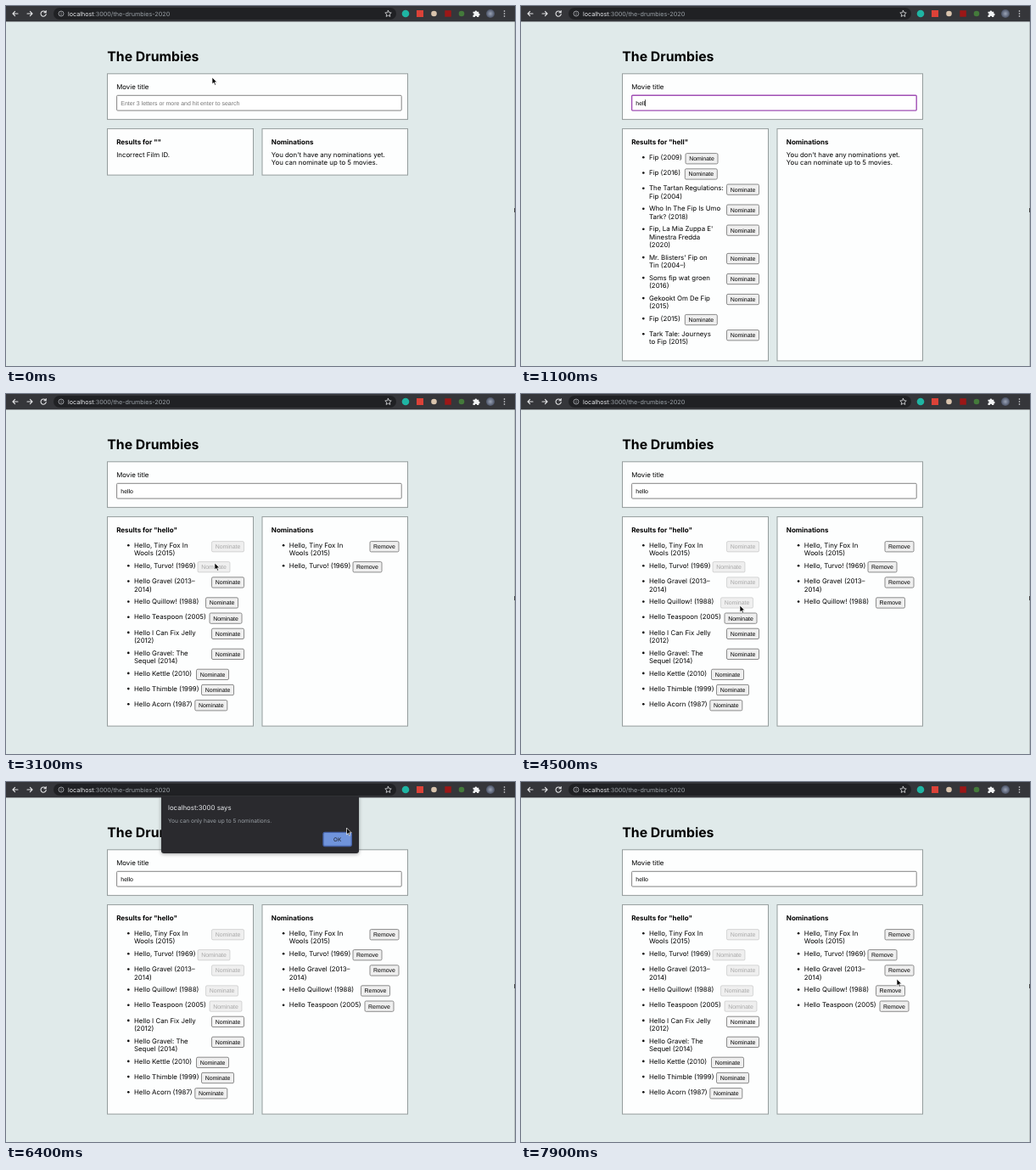
These frames come from a looping animation (600 px wide and 424 px high, 8000 ms). An HTML page:

```html
<!DOCTYPE html>
<html lang="en">
<head>
<meta charset="utf-8">
<title>Movie nominations</title>
<style>
  html, body { margin: 0; width: 100%; height: 100%; overflow: hidden; background: #e0eaea; }
  svg { display: block; width: 600px; height: 424px; }
  text { font: 7.85px Inter, Roboto, sans-serif; fill: #000; text-rendering: geometricPrecision; white-space: pre; }
  .h1 { font-size: 15.8px; font-weight: 700; }
  .h2 { font-size: 8px; font-weight: 700; }
  .ui { font-family: "Liberation Sans", Arial, sans-serif; font-size: 6.95px; }
  .hint { fill: #757575; }
  .mid { text-anchor: middle; }
  .url { font-size: 7.2px; fill: #9aa0a6; }
  .panel { fill: #fdfefe; stroke: #949c9c; stroke-width: 1; }
  .icon { fill: none; stroke: #e3e4e6; stroke-width: 1.1; stroke-linecap: round; stroke-linejoin: round; }
</style>
</head>
<body>
<svg viewBox="0 0 600 424" xmlns="http://www.w3.org/2000/svg">
  <defs>
    <radialGradient id="face"><stop offset="0" stop-color="#9aa3b5"/><stop offset="1" stop-color="#4c5468"/></radialGradient>
    <filter id="shade" x="-10%" y="-10%" width="120%" height="130%"><feDropShadow dx="0" dy="1" stdDeviation="2" flood-opacity=".35"/></filter>
  </defs>
  <rect width="600" height="424" fill="#e0eaea"/>
  <path d="M599.5 18V424" stroke="#bcc4c4"/>
  <path d="M599.5 238v5" stroke="#444"/>
  <g id="page"></g>

  <g id="toolbar">
    <rect width="600" height="18.4" fill="#35363a"/>
    <rect x="56" y="2" width="404" height="14" rx="7" fill="#202124"/>
    <path class="icon" d="M14 9H8M10.6 6.3 8 9l2.6 2.7M25 9h6M28.4 6.3 31 9l-2.6 2.7"/>
    <path class="icon" d="M46.6 7.2A3.1 3.1 0 1 0 47.2 9.6M47.2 5.6v2.2H45"/>
    <g stroke="#b4b7bb" fill="none" stroke-width=".8"><circle cx="65" cy="9" r="3"/><path d="M65 8.6v2M65 7v.7"/></g>
    <text class="url" x="73" y="11.6"><tspan fill="#e8eaed">localhost</tspan>:3000/the-drumbies-2020</text>
    <path class="icon" style="stroke-width:.8" d="M450.5 5.3l1.1 2.4 2.6.3-1.9 1.8.5 2.6-2.3-1.3-2.3 1.3.5-2.6-1.9-1.8 2.6-.3z"/>
    <circle cx="471" cy="9" r="4.3" fill="#1fb5a3"/>
    <rect x="484" y="5" width="8" height="8" fill="#db4238"/>
    <circle cx="504.5" cy="9" r="3.3" fill="#d9c4ad"/>
    <rect x="517.3" y="5.2" width="7.5" height="7.5" fill="#9c1717"/>
    <circle cx="537" cy="9" r="3.3" fill="#447a3b"/>
    <path fill="#f1f3f4" d="M550.5 6.7h2.1a1.3 1.3 0 0 1 2.6 0h2.1v2.1a1.3 1.3 0 0 1 0 2.6v1.6h-2.1a1.2 1.2 0 0 0-2.5 0h-2.2v-2.2a1.2 1.2 0 0 0 0-2.4z"/>
    <circle cx="571" cy="9" r="5" fill="url(#face)"/>
    <g fill="#e8eaed"><circle cx="587.5" cy="6" r=".8"/><circle cx="587.5" cy="9" r=".8"/><circle cx="587.5" cy="12" r=".8"/></g>
  </g>

  <g id="dialog">
    <path d="M183 17H416V81a3 3 0 0 1-3 3H186a3 3 0 0 1-3-3z" fill="#292a2d" filter="url(#shade)"/>
    <text x="191" y="33" style="fill:#e8eaed">localhost:3000 says</text>
    <text x="191" y="48.3" style="font-size:6.6px;fill:#9aa0a6">You can only have up to 5 nominations.</text>
    <rect x="374" y="59.3" width="33.3" height="16.2" rx="2" fill="#7094dc" stroke="#4866ad" stroke-width="1.3"/>
    <text class="mid" x="390.6" y="69.8" style="font-size:6.3px;fill:#202124">OK</text>
  </g>

  <g id="arrow"><path d="M0 0V8L1.9 6.3 3.2 9.2 4.5 8.6 3.2 5.8H5.7Z" fill="#000" stroke="#fff" stroke-width=".7" stroke-linejoin="round"/></g>
  <g id="beam"><path d="M-1.5-4Q0-4 0-3 0-4 1.5-4M0-3V3M-1.5 4Q0 4 0 3 0 4 1.5 4" fill="none" stroke="#222" stroke-width=".8"/></g>
</svg>
<script>
const LOOP = 8000, STEP = 100;
const $ = id => document.getElementById(id);

// Each row: button x, then the lines of the title.
const WRAP = 242.5;
const FIRST = [
  [194, "Fip (2009)"],
  [193.3, "Fip (2016)"],
  [WRAP, "The Tartan Regulations:", "Fip (2004)"],
  [WRAP, "Who In The Fip Is Umo", "Tark? (2018)"],
  [WRAP, "Fip, La Mia Zuppa E'", "Minestra Fredda", "(2020)"],
  [WRAP, "Mr. Blisters' Fip on", "Tin (2004–)"],
  [WRAP, "Soms fip wat groen", "(2016)"],
  [WRAP, "Gekookt Om De Fip", "(2015)"],
  [193.3, "Fip (2015)"],
  [WRAP, "Tark Tale: Journeys", "to Fip (2015)"],
];
const SECOND = [
  [226, "Hell Marmot (2011)"],
  [WRAP, "Hell Of A Pudding", "Spoon (2008)"],
  [222, "Hell Teapot (2016)"],
  [WRAP, "The Hell Umbrella", "Menders (2013)"],
  [WRAP, "Hell Knows Our", "Gardener (1997)"],
  [225, "Hell Pickles (2003)"],
  [WRAP, "Seven Hell Buttons", "and a Goat (2012)"],
  [220, "Hell Gravy (2010)"],
  [WRAP, "Hell Under The", "Bookcase (2006)"],
  [224, "Hell Walnut (1985)"],
];
const THIRD = [
  [WRAP, "Hello, Tiny Fox In", "Wools (2015)"],
  [226, "Hello, Turvo! (1969)"],
  [WRAP, "Hello Gravel (2013–", "2014)"],
  [235.5, "Hello Quillow! (1988)"],
  [240, "Hello Teaspoon (2005)"],
  [WRAP, "Hello I Can Fix Jelly", "(2012)"],
  [WRAP, "Hello Gravel: The", "Sequel (2014)"],
  [224.5, "Hello Kettle (2010)"],
  [230.5, "Hello Thimble (1999)"],
  [222.8, "Hello Acorn (1987)"],
];

const TYPED = [[0, ""], [800, "h"], [900, "he"], [1100, "hell"], [1400, "hello"]];
const LISTS = [[0, null], [1100, FIRST], [1200, SECOND], [1400, THIRD]];
const PICKS = [2200, 3000, 3600, 4200, 4900];
const PRESS = 5400, OPEN = 5700, CLOSE = 6800;

// Pointer path: time, x, y.
const PATH = [
  [1700, 236, 108], [2100, 252, 181], [2400, 252, 181], [2700, 246, 195], [2800, 246, 195],
  [3100, 246, 199], [3200, 246, 199], [3500, 256, 222], [3800, 256, 222], [4200, 256, 244],
  [4400, 256, 244], [4500, 258, 249], [4800, 262, 265], [4900, 262, 265], [5100, 264, 279],
  [5600, 264, 279], [6300, 399, 59], [6400, 401.5, 54], [6600, 395, 66], [6800, 395, 66],
  [7400, 399, 130], [7500, 399, 130], [7900, 443, 232],
];

const latest = (list, t) => list.filter(e => e[0] <= t).pop()[1];
const text = (x, y, s, cls = "") => `<text class="${cls}" x="${x}" y="${y}">${s}</text>`;
const panel = (x, y, w, h) => `<rect class="panel" x="${x}" y="${y}" width="${w}" height="${h}"/>`;
const rowHeight = n => n === 1 ? 18.2 : 24 + (n - 2) * 9.4;

function button(x, y, label, w, look = "") {
  const fade = look === "off" ? .3 : 1;
  const fill = look === "down" ? "#f6f6f6" : "#efefef";
  return `<rect x="${x}" y="${y}" width="${w}" height="12.3" rx="1.5" fill="${fill}" stroke="#707070" stroke-width=".8" stroke-opacity="${fade}"/>` +
    `<g opacity="${fade}">${text(x + w / 2, y + 8.6, label, "ui mid")}</g>`;
}

function rows(list, dx, makeButton) {
  let y = 180.9, out = "";
  list.forEach(([x, ...lines], i) => {
    out += `<circle cx="${144.3 + dx}" cy="${y - 2.6}" r="1.3"/>`;
    lines.forEach((s, k) => out += text(151 + dx, y + k * 9.4, s));
    out += makeButton(x, y - 7.3, i);
    y += rowHeight(lines.length);
  });
  return out;
}

function page(t) {
  const typed = latest(TYPED, t), list = latest(LISTS, t);
  const picked = PICKS.filter(p => p <= t).length;
  const focus = t >= 300 && t < 2100;
  const caret = focus && t >= 400;
  const height = list ? 41.3 + list.reduce((h, r) => h + rowHeight(r.length - 1), 0) : 54.5;

  let out = text(119.3, 65, "The Drumbies", "h1") + panel(119.5, 79.8, 354, 53.8) +
    text(130.2, 98.2, "Movie title") +
    `<rect x="130.6" y="105.3" width="335.6" height="17.8" rx="1" fill="#fff" stroke="${focus ? "#a04fb4" : "#767676"}" stroke-width="${focus ? 1.4 : .9}"/>` +
    (typed ? text(135.3, 116.6, typed, "ui") : text(135.3, 116.6, "Enter 3 letters or more and hit enter to search", "ui hint"));
  if (caret) {
    const em = [0, .556, 1.112, 1.334, 1.556, 2.112][typed.length];
    out += `<rect x="${135.4 + em * 6.95}" y="110.3" width=".7" height="7.8"/>`;
  }

  out += panel(119.5, 144.6, 172, height) + panel(302, 144.6, 171.5, height) +
    text(130.2, 163, `Results for "${typed}"`, "h2") + text(312.8, 163, "Nominations", "h2");

  out += list
    ? rows(list, 0, (x, y, i) =>
        button(x, y, "Nominate", 38, i < picked ? "off" : i === 5 && t >= PRESS ? "down" : ""))
    : text(130.2, 177.6, t < 1000 ? "Incorrect Film ID." : "Too many results.");

  out += picked
    ? rows(THIRD.slice(0, picked), 182.8, (x, y) =>
        button(x === WRAP ? 429 : x + 183, y, "Remove", 34))
    : text(312.8, 177.6, "You don't have any nominations yet.") +
      text(312.8, 187, "You can nominate up to 5 movies.");
  return out;
}

function pointer(t) {
  if (t < 100) return [243, 84];
  if (t < 400) return [235, 105];
  if (t < 1700) return null;
  const n = PATH.findIndex(p => p[0] > t);
  if (n < 0) return PATH[PATH.length - 1].slice(1);
  const [t0, x0, y0] = PATH[n - 1], [t1, x1, y1] = PATH[n];
  const u = (t - t0) / (t1 - t0);
  return [x0 + (x1 - x0) * u, y0 + (y1 - y0) * u];
}

function show(el, on) { el.setAttribute("visibility", on ? "visible" : "hidden"); }

let drawn = -1;
function draw(now) {
  const t = Math.floor(now % LOOP / STEP) * STEP;
  if (t === drawn) return;
  drawn = t;
  $("page").innerHTML = page(t);
  show($("dialog"), t >= OPEN && t < CLOSE);
  const at = pointer(t);
  const inField = at && t < 2000 && at[1] >= 105 && at[1] < 124;
  show($("arrow"), at && !inField);
  show($("beam"), inField);
  if (at) for (const id of ["arrow", "beam"]) $(id).setAttribute("transform", `translate(${at})`);
}

const start = performance.now();
function tick() {
  draw(performance.now() - start);
  requestAnimationFrame(tick);
}
tick();
</script>
</body>
</html>
```
